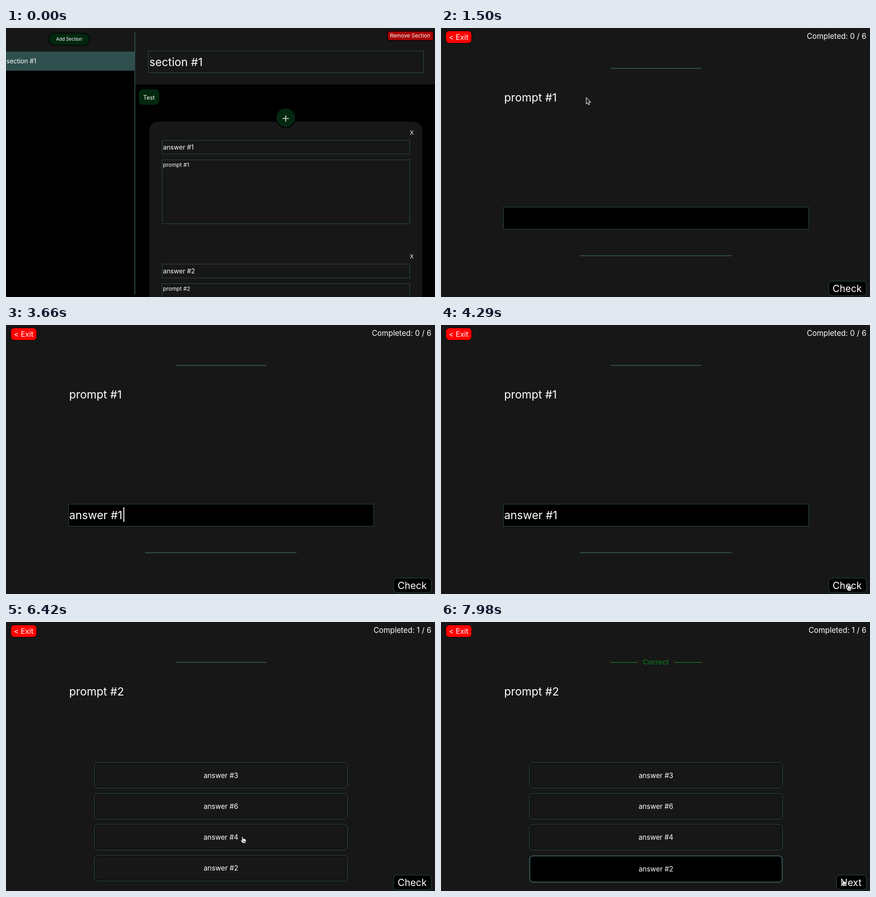
Recreate the animation shown at these times as an HTML page. Size 944x593 px, loop 8000 ms.

```html
<!DOCTYPE html>
<html lang="en">
<head>
<meta charset="utf-8">
<title>Quiz editor</title>
<style>
  html, body { margin: 0; width: 100%; height: 100%; overflow: hidden; background: #000; }
  svg { display: block; width: 100%; height: 100%; }
  text { font-family: Inter, "Open Sans", sans-serif; fill: #fff; }
  .mid { text-anchor: middle; }
  .end { text-anchor: end; }
  .gray { fill: #171717; }
  .box { fill: #171717; stroke: #2f4f4f; }
  .black { fill: #000; stroke: #2f4f4f; }
  .green { fill: #03280f; }
  .big { font-size: 24.6px; }
  .s14 { font-size: 14.2px; }
  .s12 { font-size: 12.2px; }
  .option { font-size: 15.3px; }
  .rule { stroke: #2f4f4f; stroke-width: 2; }
  .ok { stroke: #11601a; fill: #11601a; }

  /* hard cuts */
  .cut { animation: 8s step-end infinite; }
  .quiz { animation-name: quiz; }
  .first { animation-name: first; }
  .second { animation-name: second; }
  .done { animation-name: done; }
  .todo { animation-name: todo; }
  .picked { animation-name: picked; }
  .typing { animation-name: typing; }
  .caret { animation-name: caret; }
  .arrow { animation-name: arrow; }
  .hand { animation-name: hand; }
  .beam { animation-name: beam; }
  .cursor { animation: move 8s infinite; }

  @keyframes quiz { 0% { opacity: 0 } 16.125%, 100% { opacity: 1 } }
  @keyframes first { 0% { opacity: 1 } 64.5%, 100% { opacity: 0 } }
  @keyframes second { 0% { opacity: 0 } 64.5%, 100% { opacity: 1 } }
  @keyframes done { 0%, 64.5% { opacity: 0 } 55.5%, 99%, 100% { opacity: 1 } }
  @keyframes todo { 0%, 64.5% { opacity: 1 } 55.5%, 99%, 100% { opacity: 0 } }
  @keyframes picked { 0% { opacity: 0 } 86.625%, 100% { opacity: 1 } }
  @keyframes caret { 0%, 52% { opacity: 0 } 25.5% { opacity: 1 } 100% { opacity: 0 } }
  @keyframes typing {
    0% { transform: none }
    31.875% { transform: translateX(14px) }
    32.625% { transform: translateX(28px) }
    33.375% { transform: translateX(41px) }
    35.25% { transform: translateX(60px) }
    36.375% { transform: translateX(75px) }
    37.5% { transform: translateX(84px) }
    38.625% { transform: translateX(91px) }
    42% { transform: translateX(107px) }
    45.75%, 100% { transform: translateX(119px) }
  }
  @keyframes arrow {
    0%, 14.1%, 24.5%, 52.5%, 71.3%, 94.5%, 100% { opacity: 0 }
    .375%, 16.125%, 46.125%, 68.8%, 91.3% { opacity: 1 }
  }
  @keyframes hand {
    0%, 16.125%, 68.8%, 91.3% { opacity: 0 }
    14.1%, 52.5%, 71.3%, 94.5%, 100% { opacity: 1 }
  }
  @keyframes beam { 0%, 31.125%, 100% { opacity: 0 } 24.5% { opacity: 1 } }
  @keyframes move {
    0%, .375% { transform: translate(457px, 564px); animation-timing-function: ease-out }
    2.625%, 4.5% { transform: translate(415px, 264px); animation-timing-function: ease-in-out }
    8.625%, 10.2% { transform: translate(384px, 147px); animation-timing-function: ease-in-out }
    15.2%, 18.4% { transform: translate(319px, 152px); animation-timing-function: ease-in-out }
    25.875%, 45.75% { transform: translate(306px, 425px); animation-timing-function: linear }
    48%, 49.9% { transform: translate(735px, 539px); animation-timing-function: ease-out }
    53.6%, 68.3% { transform: translate(895px, 571px); animation-timing-function: ease-in }
    70.125% { transform: translate(693px, 423px); animation-timing-function: ease-out }
    73.875%, 75.8% { transform: translate(571px, 362px); animation-timing-function: ease-in }
    80.25% { transform: translate(520px, 472px); animation-timing-function: ease-out }
    83.2% { transform: translate(480px, 546px); animation-timing-function: ease-in-out }
    85.875%, 88.6% { transform: translate(505px, 531px); animation-timing-function: ease-in-out }
    96%, 100% { transform: translate(884px, 567px) }
  }
</style>
</head>
<body>
<svg viewBox="0 0 944 593" preserveAspectRatio="none">
  <defs>
    <g id="option">
      <rect class="box" x="194.5" width="557" height="56.5" rx="8"/>
      <rect x="196.5" y="2" width="553" height="52.5" rx="6" fill="none" stroke="#111" stroke-width="2"/>
    </g>
    <g id="card">
      <text class="s12 mid" x="893" y="234.5">X</text>
      <rect class="box" x="343.5" y="247.5" width="545" height="30.5"/>
      <rect class="box" x="343.5" y="290.5" width="545" height="141"/>
    </g>
  </defs>

  <!-- editor -->
  <rect width="944" height="593"/>
  <rect class="gray" width="944" height="52"/>
  <rect class="gray" x="285" width="659" height="124.5"/>
  <rect y="52" width="283" height="42" fill="#2f4f4f"/>
  <path class="rule" d="M283.5 9V587"/>
  <rect class="green" x="94" y="11.5" width="90" height="26.5" rx="13.2" stroke="#000" stroke-width="1.5"/>
  <text class="mid" x="139" y="28.3" font-size="10">Add Section</text>
  <text x="1" y="78" font-size="13.8">section #1</text>
  <rect x="839.5" y="7" width="101" height="20.5" rx="4.5" fill="#a60000" stroke="#000" stroke-width="1.5"/>
  <text class="mid" x="889.3" y="21.2" font-size="11.6">Remove Section</text>
  <rect class="box" x="313.5" y="50.5" width="605" height="48"/>
  <text class="big" x="315.5" y="83.5">section #1</text>
  <rect class="green" x="292.5" y="135" width="44.5" height="34" rx="8"/>
  <text class="mid" x="314.7" y="157.5" font-size="12.6">Test</text>
  <rect class="gray" x="315.5" y="206.5" width="600.5" height="410" rx="19"/>
  <circle cx="615.5" cy="198.5" r="22"/>
  <circle class="green" cx="615.5" cy="197.5" r="20.5"/>
  <path d="M608.5 199.5h14M615.5 192.5v14" stroke="#c4cbc6" stroke-width="2"/>
  <use href="#card"/>
  <use href="#card" y="273"/>
  <text class="s14" x="345.5" y="267.5">answer #1</text>
  <text class="s12" x="345.5" y="305.5">prompt #1</text>
  <text class="s14" x="345.5" y="540.5">answer #2</text>
  <text class="s12" x="345.5" y="578.5">prompt #2</text>

  <!-- quiz -->
  <g class="cut quiz">
    <rect class="gray" width="944" height="593"/>
    <rect x="10.5" y="6.5" width="57" height="27" rx="7.5" fill="#f00" stroke="#000"/>
    <text class="mid" x="38.7" y="26" font-size="16.2">&lt; Exit</text>

    <g class="cut first">
      <text class="end" x="936" y="23.8" font-size="16.6">Completed: 0 / 6</text>
      <text class="big" x="139" y="161.5">prompt #1</text>
      <rect class="black" x="137.5" y="395" width="671.5" height="48.5"/>
      <text class="big" x="139" y="428">answer #1</text>
      <g class="cut typing">
        <rect x="139.5" y="400" width="130" height="38"/>
        <rect class="cut caret" x="139.3" y="402" width="2" height="32" fill="#fff"/>
      </g>
      <path class="rule" d="M306 502H639.5"/>
    </g>

    <g class="cut second">
      <text class="end" x="936" y="23.8" font-size="16.6">Completed: 1 / 6</text>
      <text class="big" x="139" y="161.5">prompt #2</text>
      <use href="#option" y="309.5"/>
      <use href="#option" y="378"/>
      <use href="#option" y="446"/>
      <use href="#option" y="514.5"/>
      <text class="option mid" x="473" y="343.7">answer #3</text>
      <text class="option mid" x="473" y="412">answer #6</text>
      <text class="option mid" x="473" y="480.2">answer #4</text>
      <text class="option mid" x="473" y="548.4">answer #2</text>
      <g class="cut picked">
        <rect class="gray" x="190" y="512" width="566" height="64"/>
        <rect class="black" x="195.2" y="515.5" width="555.6" height="58" rx="7.5" stroke-width="2.5"/>
        <text class="option mid" x="473" y="550.2">answer #2</text>
      </g>
    </g>

    <g class="cut todo">
      <path class="rule" d="M373 89H573"/>
      <rect class="black" x="853" y="558" width="83" height="32" rx="8"/>
      <text class="mid" x="893.8" y="582" font-size="21.2">Check</text>
    </g>
    <g class="cut done">
      <path class="ok" d="M373 89h59M514 89h59.5" stroke-width="2"/>
      <text class="mid" x="472.7" y="94.2" font-size="15.6" font-weight="700" style="fill:#11601a">Correct</text>
      <rect class="black" x="870.5" y="558" width="65.5" height="32" rx="8"/>
      <text class="end" x="925.5" y="582" font-size="21.2">Next</text>
    </g>
  </g>

  <!-- pointer, hot spot at 0,0 -->
  <g class="cursor">
    <path class="cut arrow" d="M.5 .5V14L3.6 11.2 5.8 16 8 15 5.9 10.3H10.3Z" stroke="#fff" stroke-width="1.1"/>
    <path class="cut hand" d="M-1.2 1.2Q0 -.5 1.2 1.2L2.2 5.2Q3.3 4 4.3 5.6Q5.5 4.7 6.3 6.2Q7.8 5.6 8.3 7.5Q9 11 7.4 15H.6Q-1 12-3.4 9.6Q-3.6 7.6-1.6 8.6L-.2 9.6Z M2.6 10v3M4.6 10v3M6.4 10v3" fill="#fff" stroke="#000" stroke-width=".9"/>
    <path class="cut beam" d="M-3 -8Q0 -8 0 -6V6Q0 8-3 8M3 -8Q0 -8 0 -6M0 6Q0 8 3 8" fill="none" stroke="#ddd" stroke-width="1.2"/>
  </g>
</svg>
</body>
</html>
```
